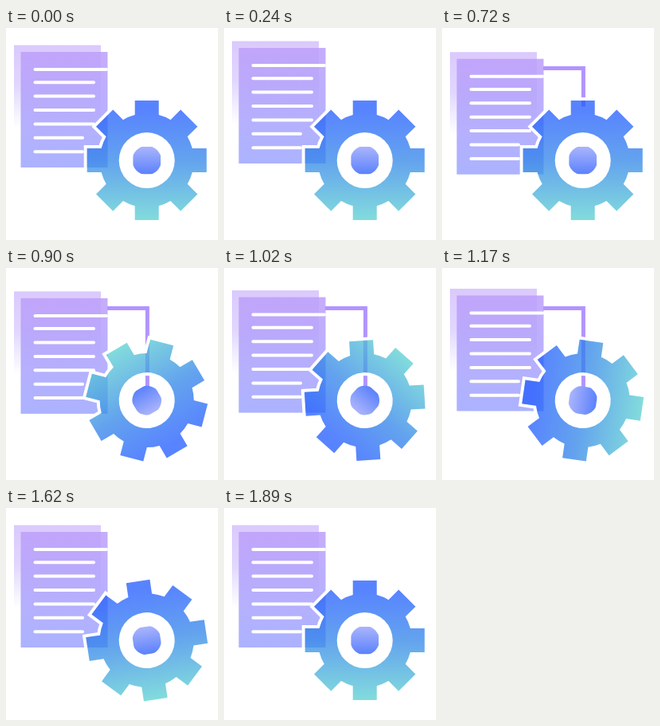
An HTML page for the animation above (3720 ms loop, 266 by 266 pixels).

```html
<!DOCTYPE html>
<html lang="en">
<head>
<meta charset="utf-8">
<title>Document processing</title>
<style>
  html, body { margin: 0; width: 100%; height: 100%; overflow: hidden; background: #fff; }
  svg { display: block; width: 100%; height: 100%; }
</style>
</head>
<body>
<svg viewBox="0 0 266 266">
  <defs>
    <linearGradient id="back" x2="0" y2="1">
      <stop stop-color="#c4a8fb" stop-opacity=".62"/>
      <stop offset=".35" stop-color="#c4aefb" stop-opacity=".5"/>
      <stop offset=".72" stop-color="#c4b4fb" stop-opacity="0"/>
    </linearGradient>
    <linearGradient id="front" x2="0" y2="1">
      <stop stop-color="#bd9ffa"/>
      <stop offset="1" stop-color="#9ea6ff"/>
    </linearGradient>
    <linearGradient id="steel" gradientUnits="userSpaceOnUse" x1="0" y1="-75" x2="0" y2="75">
      <stop offset=".08" stop-color="#205aff"/>
      <stop offset=".5" stop-color="#2f84e8"/>
      <stop offset="1" stop-color="#58d0d0"/>
    </linearGradient>
    <linearGradient id="ball" gradientUnits="userSpaceOnUse" x1="0" y1="-17" x2="0" y2="17">
      <stop stop-color="#aab4fc"/>
      <stop offset="1" stop-color="#5c82fc"/>
    </linearGradient>
    <path id="cog" fill-rule="evenodd"/>
    <clipPath id="trim"><rect x="-17.3" y="-17.2" width="34.6" height="34.4"/></clipPath>
    <mask id="outside" maskUnits="userSpaceOnUse" x="-100" y="-100" width="200" height="200">
      <rect x="-100" y="-100" width="200" height="200" fill="#fff"/>
      <use href="#cog" fill="#000"/>
    </mask>
  </defs>

  <g id="doc">
    <rect x="10" y="21.5" width="109" height="145" fill="url(#back)"/>
    <rect x="18.5" y="30" width="109" height="145" fill="url(#front)" fill-opacity=".86"/>
    <g id="rows" stroke="#fff" stroke-width="4" stroke-linecap="round"/>
  </g>
  <path id="wire" d="M127 50.4H177.4V149.4" fill="none" stroke="#b294ff" stroke-width="5"/>
  <g id="gear">
    <g mask="url(#outside)">
      <use href="#cog" fill="none" stroke="#fff" stroke-width="8"/>
    </g>
    <use href="#cog" fill="url(#steel)" fill-opacity=".75"/>
    <circle r="18.3" fill="url(#ball)" clip-path="url(#trim)"/>
  </g>
</svg>
<script>
const LOOP = 3720;
const WIRE = 149.4;
const el = id => document.getElementById(id);
const doc = el('doc'), wire = el('wire'), gear = el('gear');

function cogPath(teeth, outer, body, half, hole) {
  const base = Math.sqrt(body * body - half * half);
  const corners = [[-half, -base], [-half, -outer], [half, -outer], [half, -base]];
  let d = '';
  for (let k = 0; k < teeth; k++) {
    const a = k * 2 * Math.PI / teeth, c = Math.cos(a), s = Math.sin(a);
    const p = corners.map(([x, y]) => `${(x * c - y * s).toFixed(2)} ${(x * s + y * c).toFixed(2)}`);
    d += (k ? `A${body} ${body} 0 0 1 ` : 'M') + p.join('L');
  }
  d += `A${body} ${body} 0 0 1 ${-half} ${(-base).toFixed(2)}Z`;
  return d + `M${hole} 0A${hole} ${hole} 0 1 0 ${-hole} 0A${hole} ${hole} 0 1 0 ${hole} 0Z`;
}
el('cog').setAttribute('d', cogPath(8, 75, 59, 15, 35));

// The first row runs to the page edge, the last two are short.
el('rows').innerHTML = [126, 110, 110, 110, 110, 96, 96]
  .map((x, i) => `<path d="M36.5 ${52 + (i ? 16.2 + (i - 1) * 17.4 : 0)}H${x}"/>`).join('');

const span = (t, a, b) => Math.min(1, Math.max(0, (t - a) / (b - a)));
const smooth = u => (1 - Math.cos(Math.PI * u)) / 2;

// Cubic bezier easing (x1, 0, x2, 1), solved by bisection.
function swing(u, x1, x2) {
  let lo = 0, hi = 1;
  for (let i = 0; i < 24; i++) {
    const s = (lo + hi) / 2, r = 1 - s;
    if (3 * s * r * r * x1 + 3 * s * s * r * x2 + s * s * s < u) lo = s; else hi = s;
  }
  return lo * lo * (3 - 2 * lo);
}

function draw(t) {
  const y = -9 * smooth(span(t, 0, 450))
    + 17.7 * smooth(span(t, 450, 720))
    - 8.7 * smooth(span(t, 720, 1640));
  doc.setAttribute('transform', `translate(0 ${y.toFixed(3)})`);

  const drawn = WIRE * smooth(span(t, 540, 840));
  wire.setAttribute('stroke-dasharray', `${drawn} 400`);
  wire.setAttribute('opacity', drawn > 0 ? 1 - span(t, 1250, 1620) : 0);

  const u = span(t, 720, 1890);
  const turn = u > 0 && u < 1 ? 360 * swing(u, 0.1, 0.08) : 0;
  gear.setAttribute('transform', `translate(176.7 166.1) rotate(${turn.toFixed(3)})`);
}

const start = performance.now();
function tick() {
  draw((performance.now() - start) % LOOP);
  requestAnimationFrame(tick);
}
tick();
</script>
</body>
</html>
```
